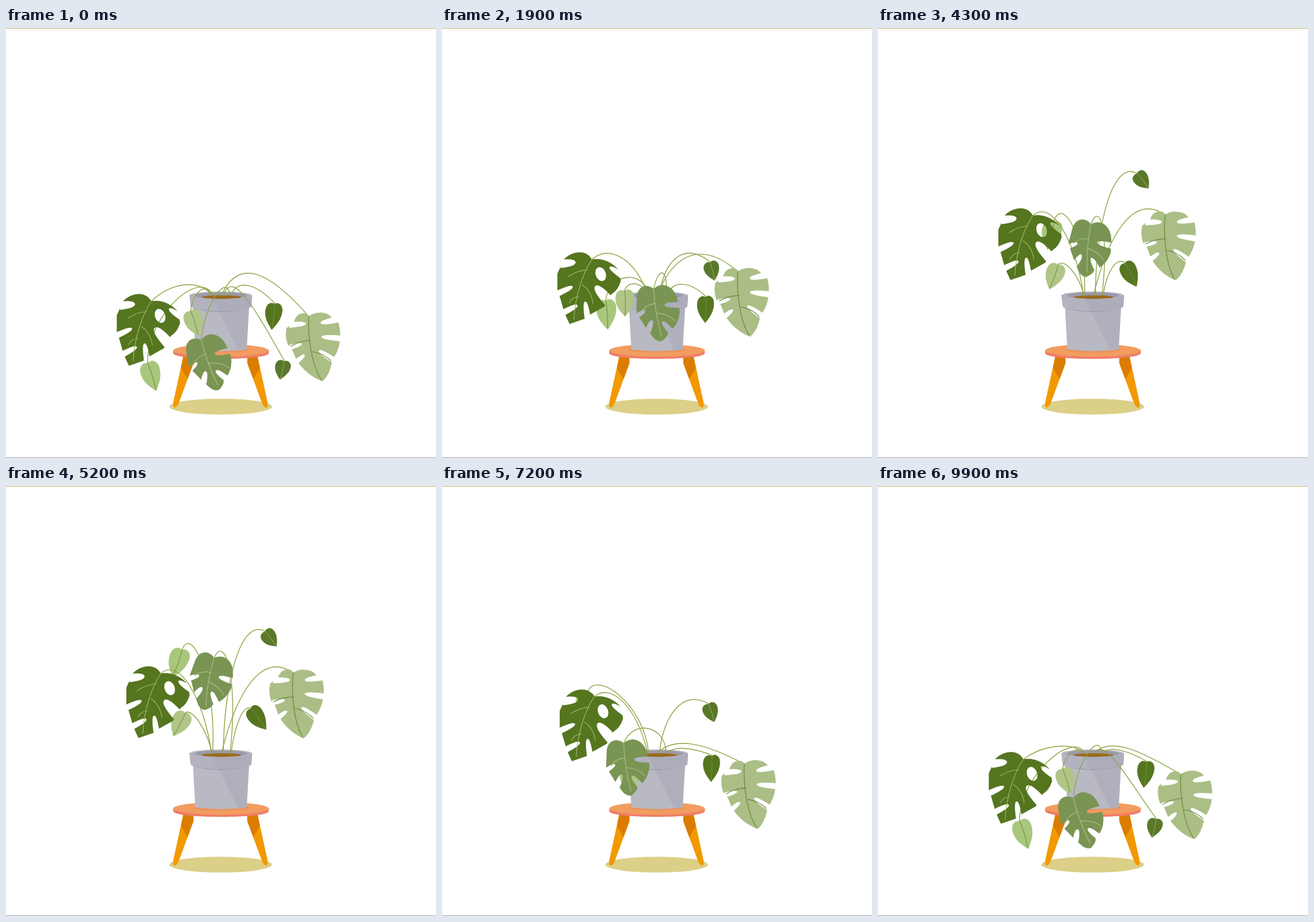
These frames come from a looping animation (720x720 px, 10 s). An HTML page:

```html
<!DOCTYPE html>
<html lang="en">
<head>
<meta charset="utf-8">
<title>Potted plant</title>
<style>
html, body { margin: 0; width: 100%; height: 100%; overflow: hidden; background: #fff; }
svg { display: block; width: 100vw; height: 100vh; }
</style>
</head>
<body>
<svg viewBox="0 0 720 720">
  <defs>
    <g id="leg">
      <path fill="#f29900" d="M297 549L314 551V561L289 629Q285 637 281 635Q279 633 280 627Z"/>
      <path fill="#db7c00" d="M297 549L314 551V561L304 588L293 569Z"/>
    </g>
  </defs>
  <rect width="720" height="1" fill="#c6b56c"/>
  <rect y="719" width="720" height="1" fill="#a8a8a8"/>
  <ellipse cx="359.5" cy="634" rx="86" ry="13.3" fill="#dccf88"/>
  <use href="#leg"/>
  <use href="#leg" transform="matrix(-1 0 0 1 718 0)"/>
  <path fill="#f07d69" d="M280 540V545C284 557 436 557 440 545V540Z"/>
  <ellipse cx="360" cy="540" rx="80" ry="10.5" fill="#f29c60"/>
  <ellipse cx="360" cy="539" rx="47" ry="4.5" fill="#e8935f"/>
  <path fill="#b9b9c3" d="M313 466L317 538Q360 544 403 538L407 466Z"/>
  <path fill="#b0b0bd" d="M352 466L389 540L403 538L407 466Z"/>
  <path fill="#a2a2b2" d="M313 467Q360 481 407 467V469Q360 483 313 469Z"/>
  <path fill="#b3b3c0" d="M307 447L309 465Q310 468 314 469Q360 479 406 469Q411 468 411 464L412 447Z"/>
  <path fill="#acacba" d="M344 452L356 474Q384 474 406 469Q411 468 411 464L412 447Z"/>
  <ellipse cx="359.5" cy="448" rx="52.5" ry="6.8" fill="#b1b1be"/>
  <ellipse cx="360" cy="448" rx="44" ry="5.3" fill="#9b9aaa"/>
  <ellipse cx="361" cy="450.5" rx="33" ry="3" fill="#9a6a1c"/>
  <g id="plant" fill="none" stroke-linecap="round" stroke-linejoin="round"></g>
</svg>
<script>
const LOOP = 10000, STEP = 100;

// Blades hang down from the stem joint at 0,0; slits run from the edge inwards: x y, x y, half width.
const heart = {
  outline: 'M0 2C4 -3 14 0 14 12C14 26 6 36 0 44C-6 36 -14 28 -14 14C-14 2 -6 -2 0 2Z',
  veins: 'M0 0Q2 22 0 42', slits: []
};
const broad = {
  outline: 'M0 0C-8 -17 -32 -15 -46 -1L-57 23V52L-53 62L-47 83L-43 94L-37 107L-11 98L-4 92L21 78L33 57Q43 52 48 36L45 18C38 8 20 -4 0 0Z',
  veins: 'M0 0C-14 20 -28 60 -30 100M-8 17Q-25 18 -39 28M-22 62Q-32 62 -38 72M-16 42Q-1 52 2 73',
  slits: [[-53, 7, -27, 4, 7], [-58, 57, -32, 45, 5], [-47, 88, -24, 76, 5],
    [-7, 98, -11, 70, 5], [30, 71, 6, 44, 9], [50, 26, 30, 12, 5]],
  hole: 'rotate(-20 15 24)'
};
const pale = {
  outline: 'M0 0C-4 -8 -20 -7 -24 8L-37 20Q-40 34 -34 49L-28 54L-20 73L-16 79Q0 100 23 108Q34 98 38 78L42 68Q50 56 52 38Q53 20 48 8L39 3C32 -8 12 -9 0 0Z',
  veins: 'M0 0C-2 30 4 80 21 106M3 40Q-16 41 -30 50M6 59Q25 62 37 74',
  slits: [[-33, 14, -5, 12, 5], [-33, 52, -12, 46, 4], [-21, 76, -7, 64, 4],
    [48, 5, 20, 11, 5], [56, 37, 21, 34, 5], [43, 74, 17, 57, 5]]
};
const small = {
  outline: 'M0 0C-8 -12 -26 -12 -31 9L-37 32Q-32 46 -28 58L-21 75L-18 81Q-12 88 -7 87Q4 82 5 77L17 70Q28 62 33 47L34 26C34 4 18 -10 0 0Z',
  veins: 'M0 0C-5 25 -7 55 -6 80M-3 24Q-20 22 -29 32M-5 40Q14 46 22 60',
  slits: [[-38, 37, -22, 31, 4], [-27, 67, -15, 50, 5], [12, 77, 1, 56, 5], [37, 36, 11, 30, 5]]
};

// low and high: x, y, turn of the joint. times: rise from, to, fall from, to.
// lift: stem arch when low, high, low again. sway: sideways bulge of the way up and down.
const leaves = [
  { blade: heart, fill: '#a8c77c', vein: '#7d9a4c', scale: [1.15, 1.12], base: [346, 447],
    low: [237, 560, -17], high: [295, 251, 22], times: [0, 5600, 6000, 9900],
    lift: [45, 40, 38], sway: [20, -41], lean: 0.2, reach: 0, bow: 18 },
  { blade: heart, fill: '#b0c687', vein: '#7f9850', scale: [1.08, 1], base: [345, 448],
    low: [309, 473, -17], high: [300, 374, 30], times: [0, 5500, 5500, 7000],
    lift: [24, 6, 16], sway: [0, 0], lean: 0.3, reach: 0.15, bow: 6 },
  { blade: heart, fill: '#59782a', vein: '#8fa354', scale: [0.9, 0.73], base: [364, 448],
    low: [466, 557, 13], high: [433, 243, -38], times: [0, 3600, 5500, 9900],
    lift: [48, 22, 30], sway: [0, 0], lean: 0.15, reach: 0.45, bow: -10 },
  { blade: heart, fill: '#55751f', vein: '#6d8b38', scale: [0.98, 1], base: [377, 447],
    low: [450, 461, 6.6], high: [408, 365, -40], times: [1400, 5500, 5500, 7400],
    lift: [28, 4, 13], sway: [-9, 19], lean: 0.15, reach: 0.42, bow: 0 },
  { blade: pale, fill: '#abbe86', vein: '#6b8639', scale: [1, 1], base: [361, 447],
    low: [507, 483, 0], high: [481, 313, 3], times: [0, 4300, 5450, 7400],
    lift: [64, 38, 28], sway: [0, 6], lean: 0.2, reach: 0.45, bow: 0 },
  { blade: broad, fill: '#55751f', vein: '#9fb56a', scale: [1, 1], base: [344, 447],
    low: [243, 458, 0], high: [259, 314.5, 0], times: [0, 3900, 6200, 9900],
    lift: [28, 30, 20], sway: [0, 0], lean: 0.2, reach: 0.3, bow: 5 },
  { blade: small, fill: '#7a9453', vein: '#a9bf82', scale: [1, 1], base: [375, 447],
    low: [327, 523, -24.8], high: [345, 275, 7], times: [0, 5500, 5500, 8200],
    lift: [38, 45, 38], sway: [24, -32], lean: 0.1, reach: 0.1, bow: 18 }
];

const plant = document.getElementById('plant');
function add(tag, attrs, parent) {
  const node = document.createElementNS('http://www.w3.org/2000/svg', tag);
  for (const name in attrs) node.setAttribute(name, attrs[name]);
  return parent.appendChild(node);
}

function slitPath([ox, oy, ix, iy, w]) {
  const length = Math.hypot(ix - ox, iy - oy);
  const nx = (oy - iy) / length * w, ny = (ix - ox) / length * w;
  return `M${ox + nx} ${oy + ny}Q${ix + nx} ${iy + ny} ${ix} ${iy}Q${ix - nx} ${iy - ny} ${ox - nx} ${oy - ny}Z`;
}

leaves.forEach((leaf, i) => {
  const { blade, fill, vein } = leaf;
  leaf.stem = add('path', { stroke: '#90a548', 'stroke-width': 1.4 }, plant);
  leaf.group = add('g', {}, plant);
  const mask = add('mask', { id: 'cut' + i, maskUnits: 'userSpaceOnUse', x: -80, y: -40, width: 160, height: 170 }, leaf.group);
  add('rect', { x: -80, y: -40, width: 160, height: 170, fill: '#fff' }, mask);
  add('path', { d: blade.slits.map(slitPath).join(''), fill: '#000' }, mask);
  if (blade.hole) add('ellipse', { cx: 15, cy: 24, rx: 8.5, ry: 12, transform: blade.hole, fill: '#000' }, mask);
  add('path', { d: blade.outline, fill, stroke: fill, mask: `url(#cut${i})` }, leaf.group);
  add('path', { d: blade.veins, stroke: vein, 'stroke-width': 1.2 }, leaf.group);
});

const mix = (a, b, u) => a + (b - a) * u;
const ramp = (t, from, to) => Math.min(1, Math.max(0, (t - from) / (to - from)));

function pose(leaf, t) {
  const [riseFrom, riseTo, fallFrom, fallTo] = leaf.times;
  const falling = t >= fallFrom;
  const height = falling ? 1 - ramp(t, fallFrom, fallTo) : ramp(t, riseFrom, riseTo);
  const [x, y, turn] = leaf.low.map((v, i) => mix(v, leaf.high[i], height));
  return {
    x: x + leaf.sway[+falling] * Math.sin(Math.PI * height), y, turn, height,
    lift: mix(leaf.lift[falling ? 2 : 0], leaf.lift[1], height)
  };
}

function draw(t) {
  for (const leaf of leaves) {
    const { x, y, turn, height, lift } = pose(leaf, t);
    const [bx, by] = leaf.base;
    const dx = x - bx, dy = y - by, bow = leaf.bow * height;
    const c1 = [bx + leaf.lean * dx + bow, by + 0.45 * Math.min(dy, 0) - lift];
    const c2 = [x - leaf.reach * dx + bow, y - lift - 0.3 * Math.max(dy, 0)];
    leaf.stem.setAttribute('d', `M${bx} ${by}C${c1} ${c2} ${x} ${y}`);
    leaf.group.setAttribute('transform', `translate(${x} ${y}) rotate(${turn}) scale(${leaf.scale})`);
  }
}

let start;
function tick(now) {
  start ??= now;
  draw(Math.floor(((now - start) % LOOP) / STEP) * STEP);
  requestAnimationFrame(tick);
}
draw(0);
requestAnimationFrame(tick);
</script>
</body>
</html>
```
